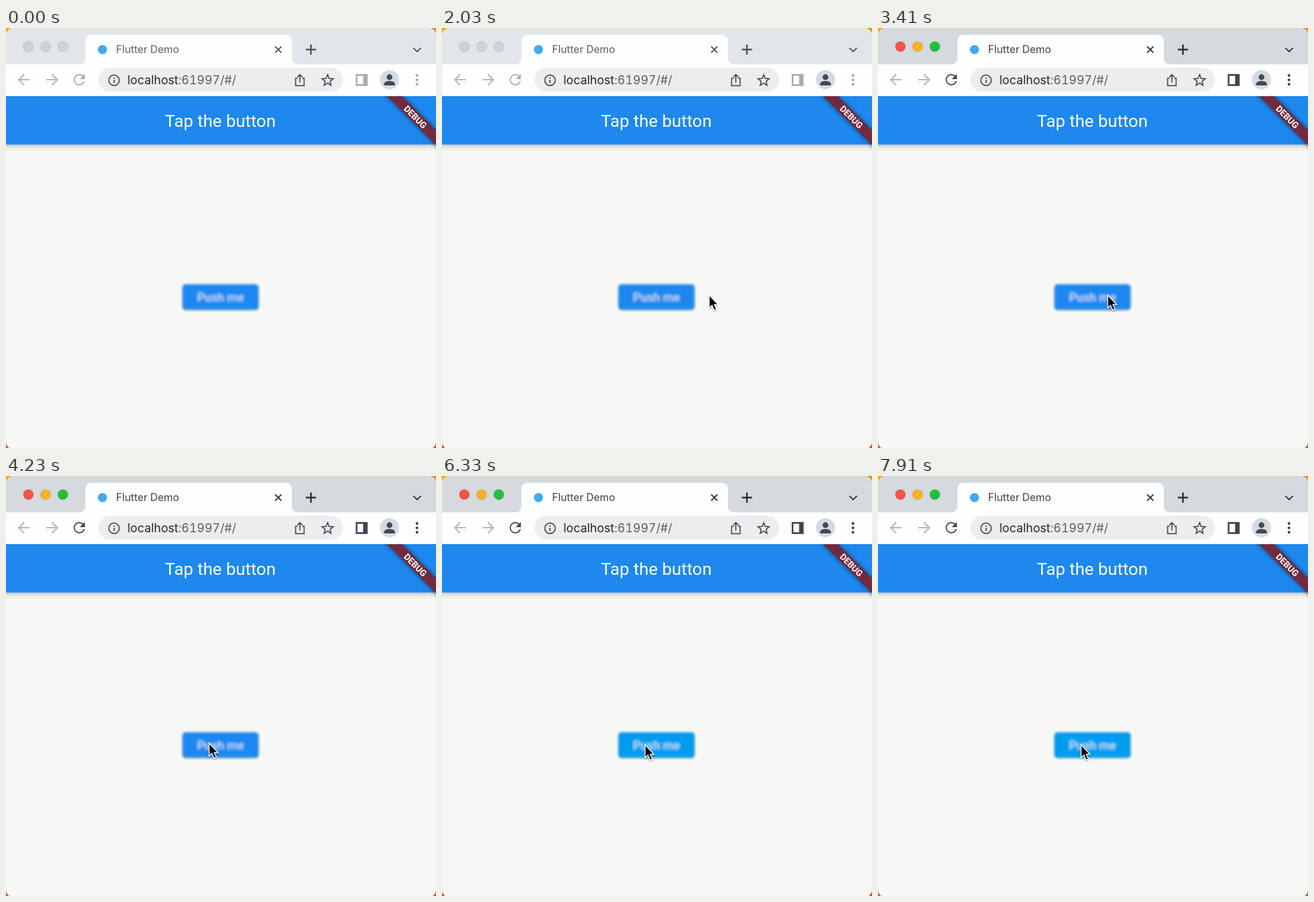
An HTML page that plays this animation: 758 by 739 pixels, repeating every 8000 ms.

```html
<!DOCTYPE html>
<html lang="en">
<head>
<meta charset="utf-8">
<title>Tap the button</title>
<style>
  html, body { margin: 0; width: 100%; height: 100%; overflow: hidden; }
  svg { display: block; width: 758px; height: 739px; }
  svg {
    --strip: #e2e5e9; --tab: #595d63; --tool: #a9acb2; --mark: #50545c;
    --red: #d0d2d5; --amber: #d0d2d5; --green: #d0d2d5; --rim: #bcbfc4;
    --button: #1e88ef;
  }
  svg.active {
    --strip: #d4dade; --tab: #3c4048; --tool: #3f4450; --mark: #2c313a;
    --red: #fb5249; --amber: #fcb225; --green: #25bf38; --rim: #0002;
  }
  svg.hover { --button: #049cef; }
  .ui { font-family: Inter, sans-serif; font-variant-numeric: tabular-nums; }
  .app { font-family: Roboto, sans-serif; fill: #fff; text-anchor: middle; }
  .line { fill: none; stroke-width: 2; }
</style>
</head>
<body>
<svg id="stage" viewBox="0 0 758 739">
  <defs>
    <linearGradient id="desk" x2=".25" y2="1">
      <stop offset="0" stop-color="#f3a01f"/>
      <stop offset="1" stop-color="#c9552f"/>
    </linearGradient>
    <linearGradient id="barShade" x2="0" y2="1">
      <stop offset="0" stop-color="#000" stop-opacity=".2"/>
      <stop offset=".4" stop-color="#000" stop-opacity=".07"/>
      <stop offset="1" stop-color="#000" stop-opacity="0"/>
    </linearGradient>
    <clipPath id="window"><rect width="758" height="741" rx="13"/></clipPath>
    <clipPath id="page"><rect y="120" width="758" height="619"/></clipPath>
    <filter id="soft" x="-20%" y="-50%" width="140%" height="200%"><feGaussianBlur stdDeviation="2"/></filter>
    <filter id="shade" x="-50%" y="-50%" width="200%" height="200%"><feGaussianBlur stdDeviation="4.5"/></filter>
    <filter id="drop" x="-60%" y="-40%" width="240%" height="200%">
      <feDropShadow dx="0" dy="1.5" stdDeviation="1.2" flood-opacity=".4"/>
    </filter>
  </defs>

  <rect width="758" height="739" fill="url(#desk)"/>
  <g clip-path="url(#window)">
    <rect width="758" height="739" fill="#f7f7f5"/>

    <!-- tab strip -->
    <rect width="758" height="64" fill="var(--strip)"/>
    <g stroke="var(--rim)">
      <circle cx="39.5" cy="32.7" r="9" fill="var(--red)"/>
      <circle cx="69.8" cy="32.7" r="9" fill="var(--amber)"/>
      <circle cx="100.2" cy="32.7" r="9" fill="var(--green)"/>
    </g>
    <path d="M128 64q12 0 12-12V24q0-12 12-12H492q12 0 12 12V52q0 12 12 12z" fill="#fdfefd"/>
    <circle cx="170" cy="38" r="8" fill="#42a9f0"/>
    <text class="ui" x="194" y="44" font-size="18.3" fill="var(--tab)">Flutter Demo</text>
    <g class="line" stroke="var(--mark)">
      <path d="M474.5 32.5l11 11m0-11l-11 11" stroke-width="2.2"/>
      <path d="M528.5 38h18M537.5 29v18" stroke-width="2.8"/>
      <path d="M718 35l6.7 6.5 6.7-6.5" stroke-width="2.3"/>
    </g>

    <!-- toolbar -->
    <rect y="64" width="758" height="56" fill="#fdfefd"/>
    <rect y="119" width="758" height="1" fill="#dcdfe2"/>
    <g class="line" stroke="#a9acb2">
      <path d="M42 91H23M32 81.5L22.5 91l9.5 9.5"/>
      <path d="M71 91H90M81 81.5l9.5 9.5-9.5 9.5"/>
    </g>
    <path class="line" d="M136.5 85.5A9 9 0 1 0 138 93.5" stroke="var(--tool)" stroke-width="2.2"/>
    <path d="M139 81v9h-9z" fill="var(--tool)"/>
    <rect x="163" y="70" width="431" height="42" rx="21" fill="#ebedef"/>
    <g class="line" stroke="#4a4f59">
      <circle cx="190.5" cy="92" r="9.3"/>
      <path d="M190.5 91v6M190.5 86.5v2.4" stroke-width="2.2"/>
      <path d="M514 88.5h-3.5v13h15v-13H522M518 96V82.5M513.5 86.5l4.5-4.5 4.5 4.5"/>
      <path id="star"/>
    </g>
    <text class="ui" x="214" y="99" font-size="21" fill="#24282f">localhost<tspan fill="#5b5f66">:61997/#/</tspan></text>
    <path d="M616.5 81h21v21h-21zm3 3v15h10v-15z" fill="var(--tool)" fill-rule="evenodd"/>
    <circle cx="676" cy="91" r="16.7" fill="#d4dadd"/>
    <g fill="#404858">
      <circle cx="676" cy="86.5" r="5"/>
      <path d="M666.5 101v-2.5c0-3.5 5-5.2 9.5-5.2s9.500 1.700 9.500 5.200v2.500z"/>
    </g>
    <g fill="var(--tool)">
      <circle cx="724.5" cy="83.5" r="2.4"/>
      <circle cx="724.5" cy="91.3" r="2.4"/>
      <circle cx="724.5" cy="99" r="2.4"/>
    </g>

    <!-- page -->
    <g clip-path="url(#page)">
      <rect y="205" width="758" height="12" fill="url(#barShade)"/>
      <rect y="120" width="758" height="85" fill="#1e88ef"/>
      <text class="app" x="377.7" y="173.7" font-size="30.4">Tap the button</text>
      <path d="M652 100H678L778 200V226z" fill="#000" opacity=".55" filter="url(#shade)"/>
      <path d="M652 100H678L778 200V226z" fill="#702b3e"/>
      <text class="app" transform="translate(721.5 156.5) rotate(45)" y="5.5" font-size="15.5" font-weight="700">DEBUG</text>
    </g>
    <rect x="312" y="454" width="133" height="43" rx="6" opacity=".2" filter="url(#soft)"/>
    <g filter="url(#soft)">
      <rect x="311" y="451" width="134" height="44.5" rx="5" fill="var(--button)"/>
      <text class="app" x="378" y="481" font-size="21" font-weight="500" fill-opacity=".72">Push me</text>
    </g>
  </g>

  <g id="cursor" filter="url(#drop)">
    <path d="M0 0V22.5L5 18l3.8 8.6 4-1.8L9 16.5h6.5z" fill="#000" stroke="#fff" stroke-width="1.5"/>
  </g>
</svg>
<script>
  const LOOP = 8000, ACTIVE_AT = 2150, HOVER_AT = 5600;
  // time, x, y of the pointer tip
  const path = [
    [0, 800, 780], [550, 770, 745], [870, 687, 638], [1330, 608, 532],
    [1900, 471, 470], [3000, 471, 470], [3700, 358, 470],
    [4500, 358, 470], [4800, 358, 473], [LOOP, 358, 473]
  ];
  const stage = document.getElementById('stage');
  const cursor = document.getElementById('cursor');

  const starPoints = Array.from({ length: 10 }, (_, i) => {
    const angle = (i / 5 - 0.5) * Math.PI, r = i % 2 ? 4.5 : 10.3;
    return `${567 + r * Math.cos(angle)} ${92.5 + r * Math.sin(angle)}`;
  });
  document.getElementById('star').setAttribute('d', `M${starPoints.join('L')}z`);

  function pointerAt(t) {
    const i = path.findIndex(step => step[0] > t);
    const [t0, x0, y0] = path[i - 1], [t1, x1, y1] = path[i];
    const k = (t - t0) / (t1 - t0);
    return [x0 + (x1 - x0) * k, y0 + (y1 - y0) * k];
  }

  const start = performance.now();
  function draw() {
    const t = Math.max(0, performance.now() - start) % LOOP;
    stage.classList.toggle('active', t >= ACTIVE_AT);
    stage.classList.toggle('hover', t >= HOVER_AT);
    cursor.setAttribute('transform', `translate(${pointerAt(t).map(Math.round)})`);
    requestAnimationFrame(draw);
  }
  draw();
</script>
</body>
</html>
```
